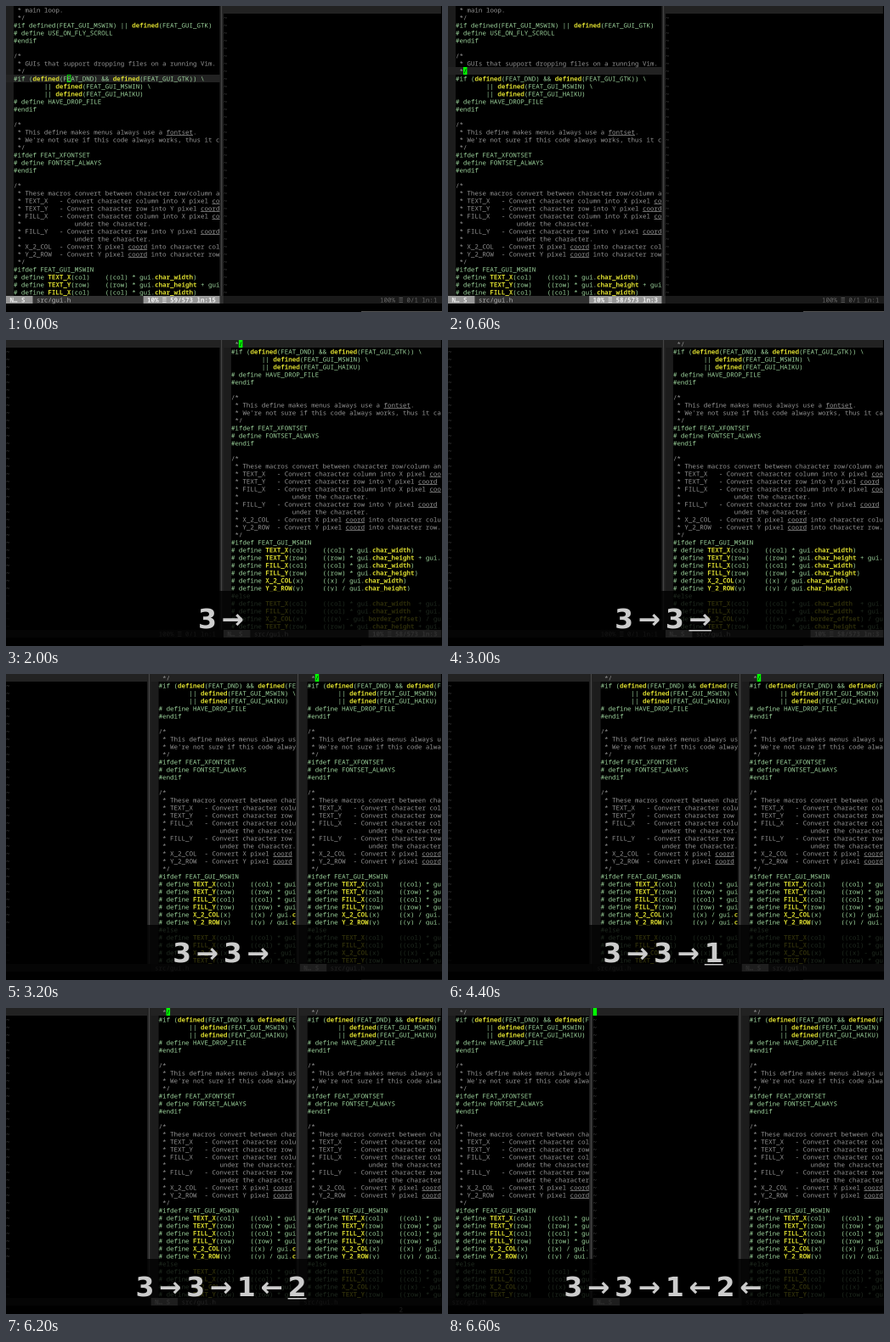
Write an HTML page with a canvas that moves like this. It is 513 px wide and 361 px high and loops after 8 s.

```html
<!DOCTYPE html>
<html lang="en">
<head>
<meta charset="utf-8">
<title>Moving editor windows</title>
<style>
html, body { margin: 0; width: 513px; height: 361px; overflow: hidden; background: #000; }
canvas { display: block; }
</style>
</head>
<body>
<canvas id="stage" width="513" height="361"></canvas>
<script>
const W = 513, H = 361, CW = 4.49, RH = 9, ROWS = 38, LOOP = 8000, SCALE = 4;
const MONO = '"Noto Sans Mono", "DejaVu Sans Mono", monospace';
const PLAIN = '7.48px ' + MONO, BOLD = 'bold 7.48px ' + MONO;
const KEYS = 'bold 31.5px "DejaVu Sans", sans-serif';

// Everything is drawn large and scaled down, so small text keeps its exact place.
const stage = document.getElementById('stage').getContext('2d');
const large = document.createElement('canvas');
large.width = W * SCALE;
large.height = H * SCALE;
const ctx = large.getContext('2d');
ctx.scale(SCALE, SCALE);
stage.imageSmoothingQuality = 'high';

const color = {
  gutter: '#1c1c1c', line: '#222222', sep: '#242424', sepLine: '#505050', tilde: '#505050',
  comment: '#989898', code: '#a0d8a0', mark: '#dcdc30', cursor: '#00ff00',
  bar: '#303030', barText: '#b8b8b8', segment: '#989898', segmentText: '#f0f0f0',
  idleBar: '#1a1a1a', idleText: '#686868', edge: '#555555'
};

const source = String.raw` * main loop.
 */
#if defined(FEAT_GUI_MSWIN) || defined(FEAT_GUI_GTK)
# define USE_ON_FLY_SCROLL
#endif

/*
 * GUIs that support dropping files on a running Vim.
 */
#if (defined(FEAT_DND) && defined(FEAT_GUI_GTK)) \
        || defined(FEAT_GUI_MSWIN) \
        || defined(FEAT_GUI_HAIKU)
# define HAVE_DROP_FILE
#endif

/*
 * This define makes menus always use a fontset.
 * We're not sure if this code always works, thus it can be disabled.
 */
#ifdef FEAT_XFONTSET
# define FONTSET_ALWAYS
#endif

/*
 * These macros convert between character row/column and pixel coordinates.
 * TEXT_X   - Convert character column into X pixel coord for drawing strings.
 * TEXT_Y   - Convert character row into Y pixel coord for drawing strings.
 * FILL_X   - Convert character column into X pixel coord for filling the area
 *              under the character.
 * FILL_Y   - Convert character row into Y pixel coord for filling the area
 *              under the character.
 * X_2_COL  - Convert X pixel coord into character column.
 * Y_2_ROW  - Convert Y pixel coord into character row.
 */
#ifdef FEAT_GUI_MSWIN
# define TEXT_X(col)    ((col) * gui.char_width)
# define TEXT_Y(row)    ((row) * gui.char_height + gui.char_ascent)
# define FILL_X(col)    ((col) * gui.char_width)
# define FILL_Y(row)    ((row) * gui.char_height)
# define X_2_COL(x)     ((x) / gui.char_width)
# define Y_2_ROW(y)     ((y) / gui.char_height)
#else
# define TEXT_X(col)    ((col) * gui.char_width  + gui.border_offset)
# define FILL_X(col)    ((col) * gui.char_width  + gui.border_offset)
# define X_2_COL(x)     (((x) - gui.border_offset) / gui.char_width)
# define TEXT_Y(row)    ((row) * gui.char_height + gui.char_ascent \ `.split('\n');

const marked = /(?<!#if )\bdefined(?=\()|(TEXT|FILL)_[XY](?=\()|X_2_COL|Y_2_ROW|char_\w+|border_offset/g;
const misspelt = /\b(coord|fontset)\b/g;

// Each window: [first column, end column, holds the file]
const two = [[0, 56, true], [57, 114, false]];
const twoSwapped = [[0, 56, false], [57, 114, true]];
const three = [[0, 37, false], [38, 76, true], [77, 114, true]];
const threeSwapped = [[0, 37, true], [38, 76, false], [77, 114, true]];

const base = { wins: two, active: 0, top: 0, row: 8, col: 2, cursor: 'solid', keys: '', held: false, cmd: '' };
const after = { ...base, wins: twoSwapped, active: 1, top: 8, row: 0, keys: '3→' };
const split = { ...after, wins: three };
const steps = [
  [0, { ...base, row: 9, col: 14, cursor: 'hollow' }],
  [400, { ...base, row: 9, col: 14 }],
  [600, base],
  [1600, { ...base, keys: '3→', held: true, cmd: '3' }],
  [1800, { ...base, keys: '3→', cursor: '' }],
  [2000, after],
  [2800, { ...after, keys: '3→3', held: true, cmd: '3' }],
  [3000, { ...after, keys: '3→3→', held: true, cursor: '' }],
  [3200, { ...split, active: 2, keys: '3→3→' }],
  [4400, { ...split, active: 2, keys: '3→3→1', held: true }],
  [4600, { ...split, keys: '3→3→1←' }],
  [6200, { ...split, keys: '3→3→1←2', held: true, cmd: '2' }],
  [6400, { ...split, keys: '3→3→1←2←', held: true, cursor: '' }],
  [6600, { ...split, wins: threeSwapped, keys: '3→3→1←2←' }]
];

function rect(x, y, w, h, fill) {
  ctx.fillStyle = fill;
  ctx.fillRect(x, y, w, h);
}

function cells(c, r, n, fill, rows = 1) {
  rect(c * CW, r * RH, n * CW, rows * RH, fill);
}

function glyph(ch, c, r, fill, font = PLAIN) {
  if (ch === ' ') return;
  const x = c * CW, y = r * RH;
  if (ch === '☰') {
    for (let i = 0; i < 3; i++) rect(x, y + 2 + i * 2.4, CW, 0.9, fill);
    return;
  }
  ctx.font = font;
  ctx.fillStyle = fill;
  ctx.fillText(ch, x, y + 7.5);
}

function print(text, c, r, fill, font) {
  [...text].forEach((ch, i) => glyph(ch, c + i, r, fill, font));
}

function drawLine(text, c, r, width) {
  const comment = /^( \*|\/\*)/.test(text);
  const bold = new Set();
  if (!comment) {
    for (const m of text.matchAll(marked)) {
      for (let i = 0; i < m[0].length; i++) bold.add(m.index + i);
    }
  }
  [...text.slice(0, width)].forEach((ch, i) => {
    const hot = bold.has(i);
    glyph(ch, c + i, r, comment ? color.comment : hot ? color.mark : color.code, hot ? BOLD : PLAIN);
  });
  if (!comment) return;
  for (const m of text.matchAll(misspelt)) {
    const n = Math.min(m[0].length, width - m.index);
    if (n > 0) rect((c + m.index) * CW, r * RH + 8.2, n * CW, 0.7, color.comment);
  }
}

function drawCursor(s, c, r, ch) {
  if (s.cursor === 'solid') {
    cells(c, r, 1, color.cursor);
    glyph(ch, c, r, '#000');
  } else if (s.cursor === 'hollow') {
    ctx.strokeStyle = color.cursor;
    ctx.lineWidth = 0.8;
    ctx.strokeRect(c * CW + 0.4, r * RH + 0.4, CW - 0.8, RH - 0.8);
  }
}

function drawStatus(s, [from, to, file], active) {
  const wide = to - from > 50;
  cells(from, ROWS, to - from + 1, active ? color.bar : color.idleBar);
  if (active) {
    cells(from, ROWS, 7, color.segment);
    print('N… S', from + 1, ROWS, color.segmentText, BOLD);
  }
  if (file) print('src/gui.h', from + (active ? 8 : 1), ROWS, active ? color.barText : color.idleText);
  if (!wide) return;
  const place = file ? `10% ☰ ${50 + s.top + s.row}/573 ln:${s.col + 1}` : '100% ☰ 0/1 ln:1';
  const start = to - place.length - 2;
  if (active) cells(start, ROWS, to - start, color.segment);
  print(place, start + 1, ROWS, active ? color.segmentText : color.idleText, active ? BOLD : PLAIN);
}

function drawSeparator(c) {
  cells(c, 0, 1, color.sep, ROWS);
  rect((c + 0.5) * CW - 0.4, 0, 0.8, ROWS * RH, color.sepLine);
}

function drawWindow(s, win, i) {
  const [from, to, file] = win, n = to - from, active = i === s.active;
  const row = file ? s.row : 0;
  if (file) cells(from, 0, 2, color.gutter, ROWS);
  cells(from, row, n, color.line);
  for (let r = 0; r < ROWS; r++) {
    if (file) drawLine(source[r + s.top] || '', from + 2, r, n - 2);
    else if (r) glyph('~', from, r, color.tilde);
  }
  if (to < 114) drawSeparator(to);
  drawStatus(s, win, active);
  if (!active) return;
  if (file) drawCursor(s, from + 2 + s.col, row, source[row + s.top][s.col]);
  else drawCursor(s, from, row, ' ');
}

function drawKeys(s) {
  rect(0, 296, W, H - 296, 'rgba(0,0,0,0.8)');
  ctx.font = KEYS;
  ctx.fillStyle = '#cccccc';
  const gap = 5.7, keys = [...s.keys];
  const widths = keys.map(k => ctx.measureText(k).width);
  const total = widths.reduce((a, b) => a + b, gap * (keys.length - 1));
  let x = 253 - total / 2;
  keys.forEach((k, i) => {
    ctx.fillText(k, x, 340);
    if (s.held && i === keys.length - 1) ctx.fillRect(x, 342, widths[i], 1.5);
    x += widths[i] + gap;
  });
}

function draw(s) {
  rect(0, 0, W, H, '#000');
  s.wins.forEach((win, i) => drawWindow(s, win, i));
  print(s.cmd, 103, 39, color.barText);
  rect(418, 360, W - 418, 1, color.edge);
  if (s.keys) drawKeys(s);
  stage.drawImage(large, 0, 0, W, H);
}

let shown = null;
const began = performance.now();
function tick() {
  const t = (performance.now() - began) % LOOP;
  const state = steps.filter(step => step[0] <= t).pop()[1];
  if (state !== shown) draw(shown = state);
  requestAnimationFrame(tick);
}
tick();
</script>
</body>
</html>
```
